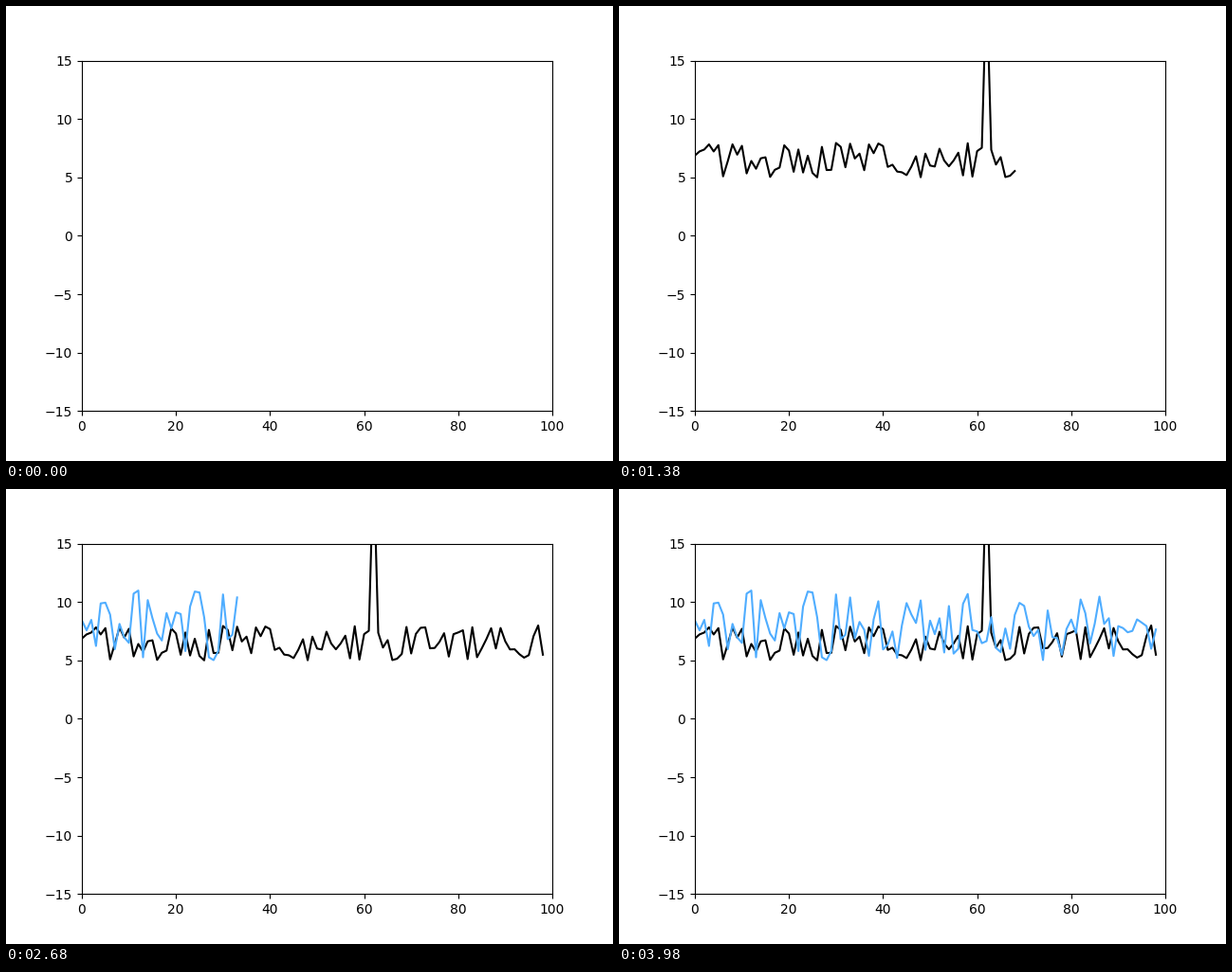
These frames come from a looping animation (640 by 480 pixels, 4 s). A matplotlib script:

```python
import random

import matplotlib.pyplot as plt
from matplotlib.animation import FuncAnimation

POINTS = 99
SWEEP = 100  # frames per curve
INTERVAL = 20
SPIKE_AT, SPIKE = 62, 22


def noise(seed, low, high):
    rng = random.Random(seed)
    return [rng.uniform(low, high) for _ in range(POINTS)]


calm = noise(5, 5, 8)
calm[SPIKE_AT] = SPIKE
lively = noise(10, 5, 11)

fig, ax = plt.subplots(figsize=(6.4, 4.8), dpi=100)
ax.set_xlim(0, 100)
ax.set_ylim(-15, 15)

curves = [
    (ax.plot([], [], color="black", lw=1.5)[0], calm),
    (ax.plot([], [], color="#4fadff", lw=1.5)[0], lively),
]


def update(frame):
    """Reveal one point per frame, first curve then second."""
    for i, (line, data) in enumerate(curves):
        shown = data[:max(0, frame - i * SWEEP)]
        line.set_data(range(len(shown)), shown)
    return [line for line, _ in curves]


anim = FuncAnimation(fig, update, frames=len(curves) * SWEEP,
                     interval=INTERVAL, repeat=True, repeat_delay=0)
plt.show()
```
